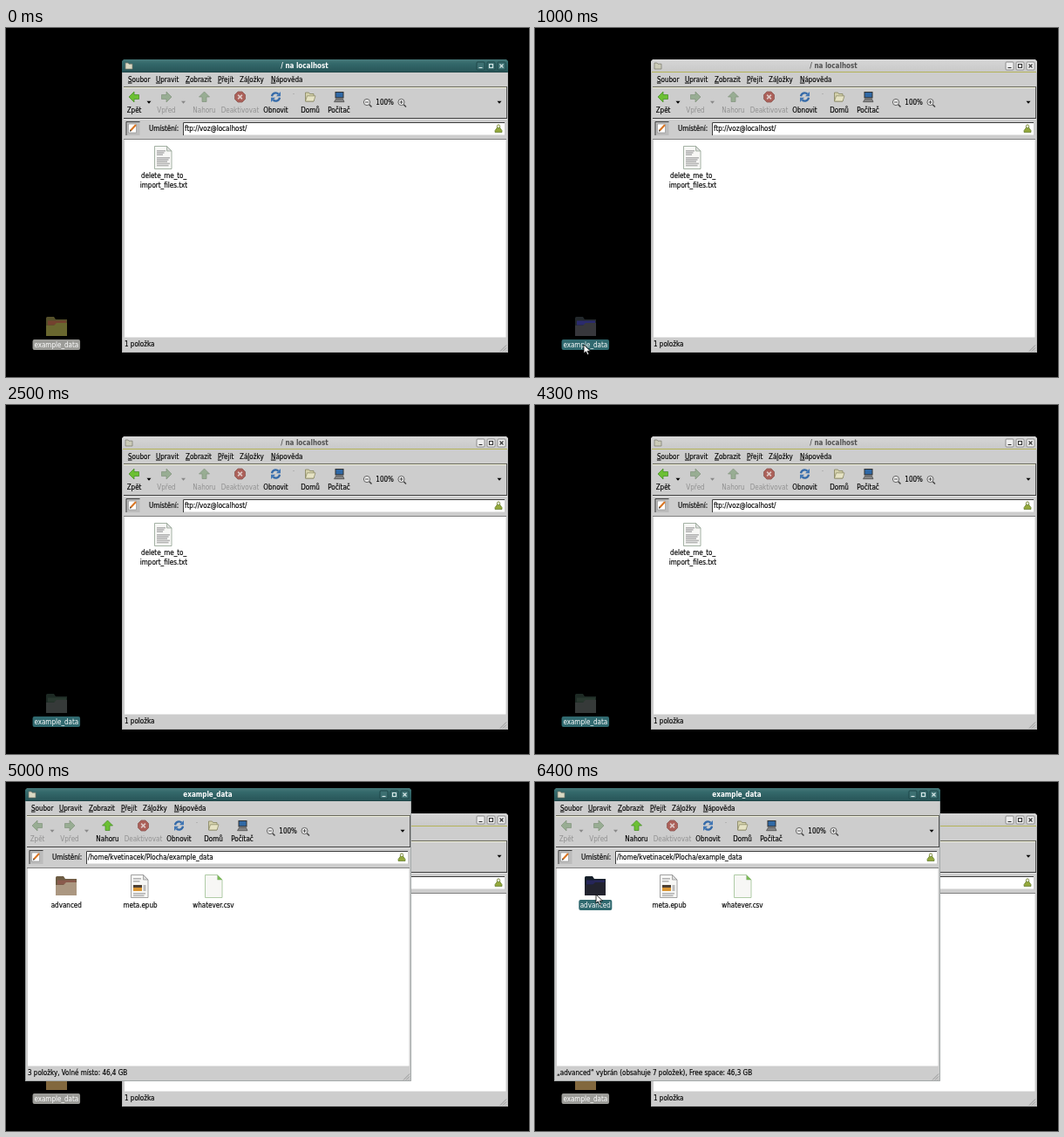
An HTML page that plays this animation: 600x400 px, repeating every 8000 ms.

```html
<!DOCTYPE html>
<html lang="cs">
<head>
<meta charset="utf-8">
<title>File manager</title>
<style>
html, body { margin: 0; width: 100%; height: 100%; overflow: hidden; background: #000; }
svg { display: block; width: 600px; height: 400px; }
text { font: 8px "DejaVu Sans Condensed", "Open Sans", sans-serif; fill: #000; stroke: #000; stroke-width: .15; white-space: pre; }
.mid { text-anchor: middle; }
.title { font-weight: bold; stroke: none; }
.off { fill: #909090; stroke: none; }
.dim { fill: #505050; }
.light { fill: #fff; stroke: none; }
tspan { text-decoration: underline; }
</style>
</head>
<body>
<svg id="stage" viewBox="0 0 600 400" xmlns="http://www.w3.org/2000/svg">
  <defs>
    <linearGradient id="teal" x2="0" y2="1">
      <stop offset="0" stop-color="#47797a"/><stop offset=".3" stop-color="#34696b"/><stop offset="1" stop-color="#275457"/>
    </linearGradient>
    <linearGradient id="grey" x2="0" y2="1">
      <stop offset="0" stop-color="#d6d6d6"/><stop offset="1" stop-color="#c8c8c8"/>
    </linearGradient>
    <clipPath id="partial">
      <path d="M22 7h218v15h223v319H23V183H21V7z"/>
    </clipPath>
  </defs>
</svg>
<script>
const LOOP = 8000, STEP = 100;
const stage = document.getElementById('stage');

const rect = (x, y, w, h, fill, extra = '') =>
  `<rect x="${x}" y="${y}" width="${w}" height="${h}" fill="${fill}" ${extra}/>`;
const path = (d, fill = 'none', stroke = 'none', width = 1) =>
  `<path d="${d}" fill="${fill}" stroke="${stroke}" stroke-width="${width}"/>`;
const text = (x, y, s, cls = '', extra = '') => `<text x="${x}" y="${y}" class="${cls}" ${extra}>${s}</text>`;
const group = (x, y, body, attrs = '') => `<g transform="translate(${x} ${y})" ${attrs}>${body}</g>`;

function arrow(x, y, angle, enabled) {
  const [fill, line] = enabled ? ['#6cc033', '#3f8a22'] : ['#98ad93', '#81927d'];
  return group(x, y, `<g transform="rotate(${angle})">` +
    path('M-6 0L0-6V-2.5H5.5V2.5H0V6z', fill, line, .7) + '</g>');
}

const triangle = (x, y, fill = '#000') => path(`M${x - 2.5} ${y - 1.3}h5l-2.5 3z`, fill);

function magnifier(x, y, plus) {
  return group(x, y,
    path('M2.2 2.2L5 5', 'none', '#444', 1.5) +
    '<circle cx="-.5" cy="-.5" r="3.6" fill="#eee" stroke="#555" stroke-width=".9"/>' +
    path('M-2.5-.5h4' + (plus ? 'M-.5-2.5v4' : ''), 'none', '#444', .9));
}

const refresh = (x, y) => group(x, y,
  path('M-4.5-.8A4.5 4.5 0 0 1 3-3.4M4.5.8A4.5 4.5 0 0 1-3 3.4', 'none', '#356aa8', 2.3) +
  path('M5.5-6V-.8H.4zM-5.5 6V.8H-.4z', '#4076b4'));

const stop = (x, y) => group(x, y,
  path('M-2.5-6h5L6-2.5v5L2.5 6h-5L-6 2.5v-5z', '#ab6059', '#8d5a54', .8) +
  path('M-2.4-2.4L2.4 2.4M2.4-2.4L-2.4 2.4', 'none', '#ddc9c6', 1.6));

const home = (x, y) => group(x, y,
  path('M-5.5 5V-5h4l1 1.5H4V5z', '#d5d2ac', '#85835f', .8) +
  path('M-5.5 5L-3.5-1.2H6L4 5z', '#e6e3c4', '#85835f', .7));

const computer = (x, y) => group(x, y,
  rect(-4.5, -6, 10, 7.5, '#333') + rect(-3.5, -5, 8, 5.3, '#2f68a5') +
  path('M-3.5 2.3h8l1.5 3.4H-5.5z', '#858585', '#444', .7));

const lock = (x, y) => group(x, y,
  path('M-1.6-1v-2a1.6 1.6 0 0 1 3.2 0v2', 'none', '#7d8a3c', 1) +
  path('M-1.6-1.2h3.2L4 2v2h-8V2z', '#94a83c', '#5f7a2a', .7));

function pencil(x, y) {
  return rect(x - 8, y - 8, 16, 16, '#bcbcbc') +
    path(`M${x - 7.5} ${y + 8}V${y - 7.5}H${x + 8}`, 'none', '#3c3c3c') +
    rect(x - 5, y - 5, 9, 10, '#fff', 'stroke="#888" stroke-width=".6"') +
    path(`M${x - 2.5} ${y + 2.5}l6-6.5`, 'none', '#d97524', 2) +
    path(`M${x - 3.6} ${y + 3.8}l.5-2.2 1.6 1.5z`, '#333');
}

// Folder icon, 24 x 23; tones: back, strip, front.
function folder(back, strip, front) {
  return path('M0 23V2.5Q0 1 1.5 1H9l2 3h13v19z', back) +
    rect(2, 5.5, 21, 5, strip) +
    path('M0 23V11h9l3-3h12v15z', front);
}

function page(line, body) {
  return path('M.5.5h14l5.5 5.5v20.5H.5z', '#f7f7f5', line, .8) +
    path('M14.5.5V6H20z', '#ddd', line, .7) + body;
}

const textLines = (x, y, w, count, gap) =>
  Array.from({ length: count }, (_, i) => rect(x, y + i * gap, w - (i % 3) * 1.5, 1.6, '#b4b4b4')).join('');

function titleButtons(active) {
  const glyphs = ['M-2 2h4', 'M-2-2h4v4h-4z', 'M-2-2L2 2M2-2L-2 2'];
  const [fill, line, ink] = active ? ['#3d7072', '#1c4446', '#d9e8e8'] : ['#eee', '#858585', '#333'];
  return glyphs.map((g, i) => group(544.5 + i * 12, 43.5,
    rect(-4.5, -4.5, 9, 9, fill, `rx="1" stroke="${line}" stroke-width=".9"`) + path(g, 'none', ink, 1.1))).join('');
}

function titleBar(title, active) {
  return path('M133 51V38l2-2h439l2 2v13z', active ? 'url(#teal)' : 'url(#grey)') +
    rect(134, 50, 441, 1, active ? '#1f4547' : '#b4b35a') +
    path('M137 47v-7h3l1 1.2h4V47z', active ? '#d9d9c3' : '#cbcbb8', '#77776a', .7) +
    text(342.5, 46.2, title, 'mid title ' + (active ? 'light' : 'dim')) + titleButtons(active);
}

const menu = [
  [140, '<tspan>S</tspan>oubor'], [172, '<tspan>U</tspan>pravit'], [206, '<tspan>Z</tspan>obrazit'],
  [243, '<tspan>P</tspan>řejít'], [268, 'Zá<tspan>l</tspan>ožky'], [304, '<tspan>N</tspan>ápověda']
];

function windowBody({ address, status, canBack, canUp }) {
  const tool = (x, label, on = true) => text(x, 96.6, label, 'mid ' + (on ? '' : 'off'));
  return rect(133, 50, 443, 322, '#cdcdcd') +
    menu.map(([x, s]) => text(x, 61.7, s)).join('') +
    rect(135, 67, 440, 1, '#6a6a5c') + rect(135, 68, 439, 1, '#f0f0dc') +
    rect(574, 67, 1, 37, '#555') +
    arrow(147, 79, 0, canBack) + tool(147, 'Zpět', canBack) + triangle(164, 85, canBack ? '#000' : '#888') +
    arrow(184, 79, 180, false) + tool(184, 'Vpřed', false) + triangle(203.5, 85, '#888') +
    arrow(227.5, 79, 90, canUp) + tool(227.5, 'Nahoru', canUp) +
    stop(268.5, 79) + tool(268.5, 'Deaktivovat', false) +
    refresh(309.5, 79) + tool(309.5, 'Obnovit') +
    rect(329.5, 75, 1, 1, '#999') +
    home(349, 79) + tool(349, 'Domů') +
    computer(382, 79) + tool(382, 'Počítač') +
    magnifier(414.5, 85.5, false) + text(424.3, 88, '100%') + magnifier(454, 85.5, true) +
    triangle(566, 85) +
    rect(135, 103, 440, 1, '#3c3c3c') + rect(135, 104, 440, 1, '#e4e4e4') +
    pencil(145.5, 115) + text(164, 117.9, 'Umístění:') +
    rect(203, 108, 369, 14.5, '#fff') + path('M203.5 123V108.5H572', 'none', '#3c3c3c') +
    text(205, 117.9, address) + lock(565, 115.5) +
    rect(135, 127, 439, 1, '#808080') + rect(136, 128, 437.5, 226.5, '#fff') +
    text(136, 365.4, status, 'status') +
    path('M567 370.5l7-7M570 370.5l4-4M573 370.5l1-1', 'none', '#888', .8);
}

const border = stroke => path('M133.5 51V371.5H575.5V51', 'none', stroke);

const labelled = (id, x, y, w, label, fill, cls) =>
  rect(x - w / 2, y - 6, w, 12, fill, `id="${id}Pill" rx="2"`) +
  text(x, y + 2.8, label, 'mid ' + cls, `id="${id}Label"`);

const icons = {
  idle: folder('#55502a', '#74422f', '#69672f'),
  chosen: folder('#22282c', '#2b2b6e', '#37373c'),
  opening: folder('#1d2a24', '#29382f', '#363a39'),
  opened: folder('#655131', '#82412e', '#82683e'),
  plain: folder('#6e5d44', '#8a5a4c', '#ab9781'),
  picked: folder('#17202a', '#26265a', '#22232f')
};
const SELECTED = '#30696f', RESTING = '#9c9c98';

const desktop = group(46, 330, '', 'id="deskIcon"') +
  labelled('desk', 57.8, 363, 54.5, 'example_data', RESTING, 'light');

const remote = windowBody({ address: 'ftp://voz@localhost/', status: '1 položka', canBack: true, canUp: false }) +
  `<g id="titleOn">${titleBar('/ na localhost', true)}</g><g id="titleOff">${titleBar('/ na localhost', false)}</g>` +
  border('#b8b8b8') +
  group(170, 135, page('#8fa08f', textLines(3, 5, 10, 3, 2.2) + textLines(3, 13, 15, 5, 2.2))) +
  text(181, 172.4, 'delete_me_to_', 'mid') + text(181, 183, 'import_files.txt', 'mid');

const epub = page('#8c8c8c', textLines(3, 4, 9, 2, 3) + rect(3, 12, 10, 7, '#d99533') +
  rect(3, 12, 10, 3, '#4d4034') + rect(14.5, 12, 3, 7, '#bbb') + textLines(3, 21, 14, 2, 2.5));
const csv = page('#9dbf91', path('M15 1v5h5z', '#7cba57'));

const local = group(-111, -29,
    windowBody({ address: '/home/kvetinacek/Plocha/example_data', status: '', canBack: false, canUp: true }) +
    titleBar('example_data', true) + border('#a4a9a9')) +
  group(57, 107, '', 'id="dirIcon"') + group(143, 106, epub) + group(228, 106, csv) +
  labelled('dir', 69.3, 141, 38, 'advanced', SELECTED, '') +
  text(154, 143.6, 'meta.epub', 'mid') + text(238, 143.6, 'whatever.csv', 'mid');

stage.insertAdjacentHTML('beforeend',
  rect(0, 0, 600, 400, '#000') + desktop + `<g>${remote}</g><g id="local">${local}</g>` +
  group(0, 0, path('M0 0v10l2.4-2.2 1.7 3.8 1.8-.8-1.7-3.6h3.4z', '#fff', '#000', .8), 'id="cursor"'));

const parts = Object.fromEntries(['deskIcon', 'deskPill', 'titleOn', 'titleOff', 'local', 'dirIcon',
  'dirPill', 'dirLabel', 'cursor'].map(id => [id, document.getElementById(id)]));
const localStatus = parts.local.querySelector('.status');

const show = (node, on) => node.setAttribute('visibility', on ? 'inherit' : 'hidden');
function setIcon(node, markup) {
  if (node.markup !== markup) node.innerHTML = node.markup = markup;
}

// Pointer visits: time, x, y
const visits = [
  [[100, 84, 396], [600, 59, 366], [800, 56, 363], [2200, 56, 363], [2400, 57, 368]],
  [[5100, 57, 354], [5800, 74, 134], [6000, 70, 129], [LOOP, 70, 129]]
];

function pointerAt(t) {
  const track = visits.find(v => t >= v[0][0] && t <= v[v.length - 1][0]);
  if (!track) return null;
  const i = Math.max(1, track.findIndex(k => k[0] >= t));
  const [t0, x0, y0] = track[i - 1], [t1, x1, y1] = track[i];
  const k = (t - t0) / (t1 - t0);
  return [x0 + (x1 - x0) * k, y0 + (y1 - y0) * k];
}

function draw(now) {
  const t = Math.floor((now % LOOP) / STEP) * STEP;
  const selected = t >= 900 && t < 4400;
  const picked = t >= 6300;

  setIcon(parts.deskIcon, t < 900 ? icons.idle : t < 2500 ? icons.chosen : t < 4400 ? icons.opening : icons.opened);
  parts.deskPill.setAttribute('fill', selected ? SELECTED : RESTING);
  show(parts.titleOn, t < 1000);
  show(parts.titleOff, t >= 1000);

  show(parts.local, t >= 4400);
  parts.local.setAttribute('clip-path', t < 4500 ? 'url(#partial)' : 'none');
  setIcon(parts.dirIcon, picked ? icons.picked : icons.plain);
  show(parts.dirPill, picked);
  parts.dirLabel.setAttribute('class', picked ? 'mid light' : 'mid');
  localStatus.textContent = picked
    ? '„advanced“ vybrán (obsahuje 7 položek), Free space: 46,3 GB'
    : '3 položky, Volné místo: 46,4 GB';

  const p = pointerAt(t);
  show(parts.cursor, p);
  if (p) parts.cursor.setAttribute('transform', `translate(${p[0]} ${p[1]})`);
}

function tick() {
  draw(performance.now());
  requestAnimationFrame(tick);
}
tick();
</script>
</body>
</html>
```
